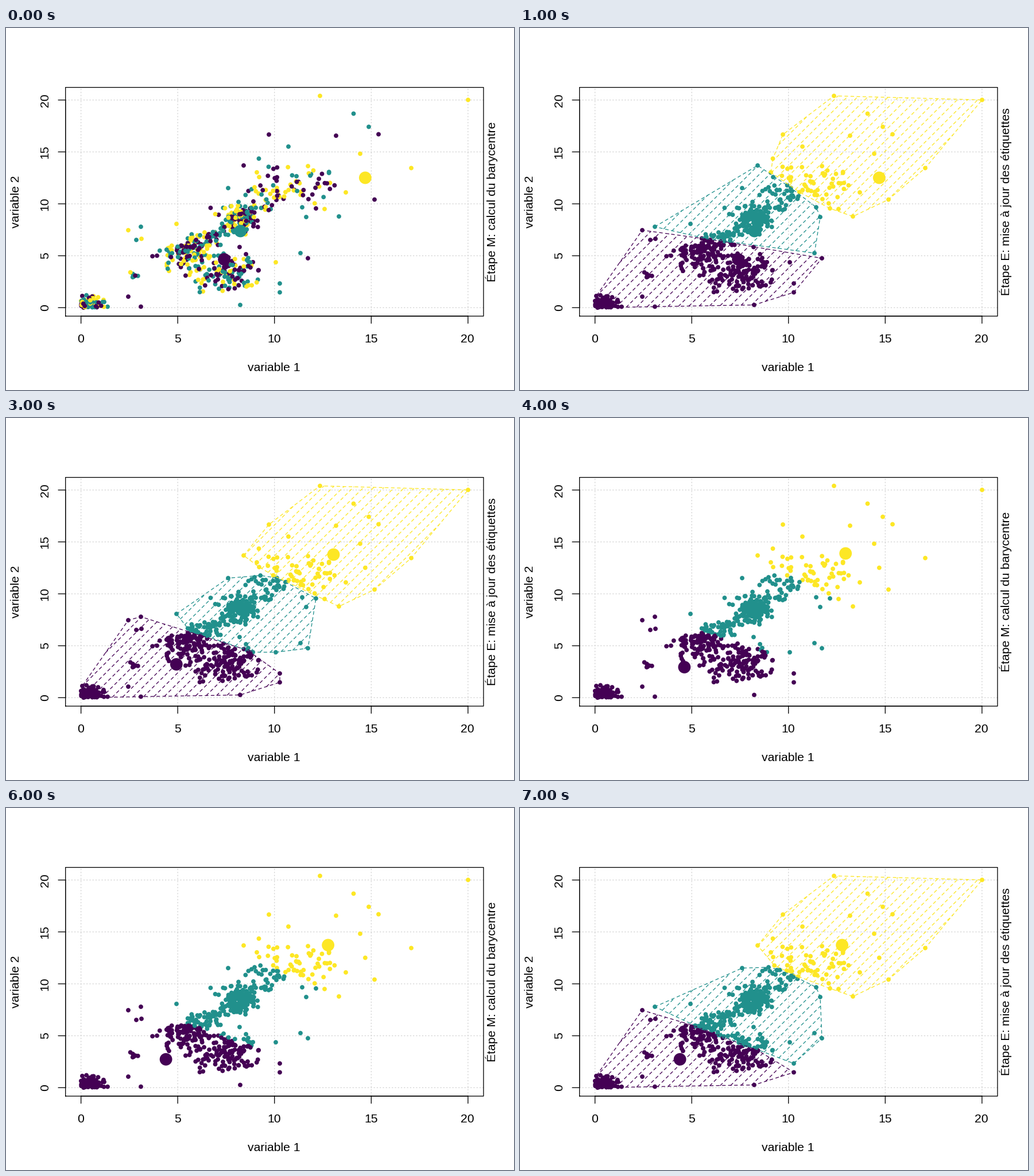
Animation of 885 by 632 pixels, one loop 8 s. Source, as a matplotlib script:

```python
import numpy as np
import matplotlib.pyplot as plt
from matplotlib.animation import FuncAnimation
from matplotlib.collections import LineCollection

W, H = 885, 632
PT = 0.72                      # points per pixel at 100 dpi
LW = 1.317 * PT
FONT = dict(family="Liberation Sans", size=21.15 * PT, color="black")
COLORS = np.array(["#440154", "#21908C", "#FDE725"])

# Plot margins are counted in text lines
LINE = 25.286
LEFT, RIGHT = 4.1 * LINE, W - 2.1 * LINE
TOP, BOTTOM = 4.1 * LINE, H - 5.1 * LINE
MID_X, MID_Y = (LEFT + RIGHT) / 2, (TOP + BOTTOM) / 2
ORIGIN = np.array([130.64, 488.25])
SCALE = np.array([33.71, -18.127])
HATCH = 17.88                  # horizontal distance between hatch lines

# Barycentres after each M step
CENTERS = np.array([
    [(7.40, 4.65), (8.24, 7.38), (14.69, 12.51)],
    [(4.93, 3.21), (8.29, 8.46), (13.05, 13.78)],
    [(4.62, 2.94), (8.18, 8.20), (12.95, 13.89)],
    [(4.39, 2.73), (8.00, 7.70), (12.77, 13.73)],
])

# Outlying points in pixels, grouped by their first label
OUTLIERS = [
    [(575, 188), (649, 185.5), (458, 186), (414, 240), (642, 299.5),
     (526, 402), (235, 486.5), (213, 469), (540, 315)],
    [(605.5, 149.5), (632, 172.5), (440.5, 228), (492, 207), (387, 279.5),
     (235, 347), (227, 370), (513, 393), (408, 483.5), (477, 446),
     (477, 461.5), (580, 329), (516, 313), (523, 330)],
    [(547, 118.5), (706, 244.5), (805, 125.5), (617, 219.5), (213, 353),
     (236, 368), (297, 342), (437, 252), (433, 278), (592, 287),
     (555, 316), (470, 409)],
]

# Round clouds: count, centre, spread
CLOUDS = [
    (75, (8.4, 8.4), (0.45, 0.70)),
    (105, (6.7, 4.0), (1.30, 1.25)),
    (55, (7.9, 3.2), (0.75, 0.85)),
    (45, (5.7, 5.4), (0.60, 0.60)),
    (22, (7.8, 9.0), (0.60, 0.80)),
    (32, (9.7, 10.6), (0.60, 0.80)),
    (52, (11.1, 12.0), (1.00, 1.15)),
    (18, (4.5, 4.4), (0.50, 0.80)),
    (6, (2.9, 3.1), (0.30, 0.30)),
]


def to_px(p):
    return ORIGIN + np.asarray(p) * SCALE


def to_data(p):
    return (np.asarray(p) - ORIGIN) / SCALE


def bounded_normal(rng, n, reach=2.05):
    z = rng.normal(size=(4 * n, 2))
    return z[np.hypot(z[:, 0], z[:, 1]) < reach][:n]


def make_points():
    rng = np.random.default_rng(12)
    corner = np.abs(bounded_normal(rng, 90)) * (0.72, 0.62)
    x = rng.uniform(5, 9, 115)
    ridge = np.column_stack([x, 0.9 + 0.9 * x + rng.normal(0, 0.42, x.size)])
    clouds = [bounded_normal(rng, n) * spread + center
              for n, center, spread in CLOUDS]
    parts = [np.vstack([corner, ridge, *clouds])]
    labels = [rng.integers(0, 3, len(parts[0]))]
    for k, group in enumerate(OUTLIERS):
        parts += [to_data(group), CENTERS[0][k:k + 1]]
        labels.append(np.full(len(group) + 1, k))
    return np.vstack(parts), np.concatenate(labels)


def nearest(points, centers):
    gap = points[:, None, :] - centers[None, :, :]
    return (gap ** 2).sum(axis=2).argmin(axis=1)


def convex_hull(points):
    pts = sorted(map(tuple, points))

    def chain(seq):
        out = []
        for p in seq:
            while len(out) > 1:
                (ax, ay), (bx, by) = out[-2:]
                if (bx - ax) * (p[1] - ay) - (by - ay) * (p[0] - ax) > 0:
                    break
                out.pop()
            out.append(p)
        return out[:-1]

    return np.array(chain(pts) + chain(pts[::-1]))


def hatch_lines(poly):
    """45 degree lines inside a convex polygon, anchored at the plot origin."""
    key = (poly.sum(axis=1) - ORIGIN.sum()) / HATCH
    lines = []
    for k in range(int(np.ceil(key.min())), int(np.floor(key.max())) + 1):
        hits = []
        for i in range(len(poly)):
            j = (i + 1) % len(poly)
            if (key[i] < k) != (key[j] < k):
                t = (k - key[i]) / (key[j] - key[i])
                hits.append(poly[i] + t * (poly[j] - poly[i]))
        if len(hits) == 2:
            lines.append(sorted(hits, key=lambda p: p[0]))
    return lines


points, first_labels = make_points()
pixels = to_px(points)

fig = plt.figure(figsize=(W / 100, H / 100), dpi=100, facecolor="white")
ax = fig.add_axes([0, 0, 1, 1])
ax.set_xlim(0, W)
ax.set_ylim(H, 0)
ax.axis("off")


def line(xs, ys, **style):
    opts = dict(color="black", lw=LW, snap=False, zorder=2,
                solid_capstyle="round", dash_capstyle="round")
    ax.plot(xs, ys, **{**opts, **style})


def label(x, y, text, rotation=0):
    return ax.text(x, y, text, rotation=rotation, rotation_mode="anchor",
                   ha="center", va="baseline", zorder=7, **FONT)


grid = dict(color="#D3D3D3", ls=(0, (1, 3)), zorder=1)
tick = LINE / 2
for v in range(0, 21, 5):
    x, y = to_px((v, v))
    line([x, x], [BOTTOM, TOP], **grid)
    line([LEFT, RIGHT], [y, y], **grid)
    line([x, x], [BOTTOM, BOTTOM + tick])
    line([LEFT, LEFT - tick], [y, y])
    label(x - 0.6, BOTTOM + 1.8 * LINE, str(v))
    label(LEFT - 1.2 * LINE + 0.5, y, str(v), 90)

(x0, y0), (x1, y1) = to_px([(0, 0), (20, 20)])
line([x0, x1], [BOTTOM, BOTTOM])
line([LEFT, LEFT], [y0, y1])
line([LEFT, RIGHT, RIGHT, LEFT, LEFT], [BOTTOM, BOTTOM, TOP, TOP, BOTTOM])

label(MID_X - 0.6, BOTTOM + 3.8 * LINE, "variable 1")
label(LEFT - 3.2 * LINE + 0.7, MID_Y, "variable 2", 90)
caption = label(RIGHT + 0.8 * LINE + 1, MID_Y, "", 90)

dots = ax.scatter(*pixels.T, s=(7.8 * PT) ** 2, lw=0, zorder=3)
big = ax.scatter(*to_px(CENTERS[0]).T, s=(21.8 * PT) ** 2, lw=0,
                 c=COLORS, zorder=5)
zones = []
for color in COLORS:
    zone = LineCollection([], colors=color, linewidths=LW, zorder=4,
                          linestyles=[(0, (4, 4))], capstyle="round")
    zones.append(ax.add_collection(zone, autolim=False))


def draw(frame):
    labels = first_labels
    if frame > 0:
        labels = nearest(points, CENTERS[(frame - 1) // 2])
    dots.set_facecolor(COLORS[labels])
    big.set_offsets(to_px(CENTERS[frame // 2]))

    expectation = frame % 2 == 1
    for k, zone in enumerate(zones):
        segments = []
        if expectation:
            hull = convex_hull(pixels[labels == k])
            segments = [np.vstack([hull, hull[:1]])] + hatch_lines(hull)
        zone.set_segments(segments)
    caption.set_text("Étape E: mise à jour des étiquettes" if expectation
                     else "Étape M: calcul du barycentre")
    return [dots, big, caption, *zones]


anim = FuncAnimation(fig, draw, frames=8, interval=1000, repeat=True,
                     repeat_delay=0, blit=False)
plt.show()
```
